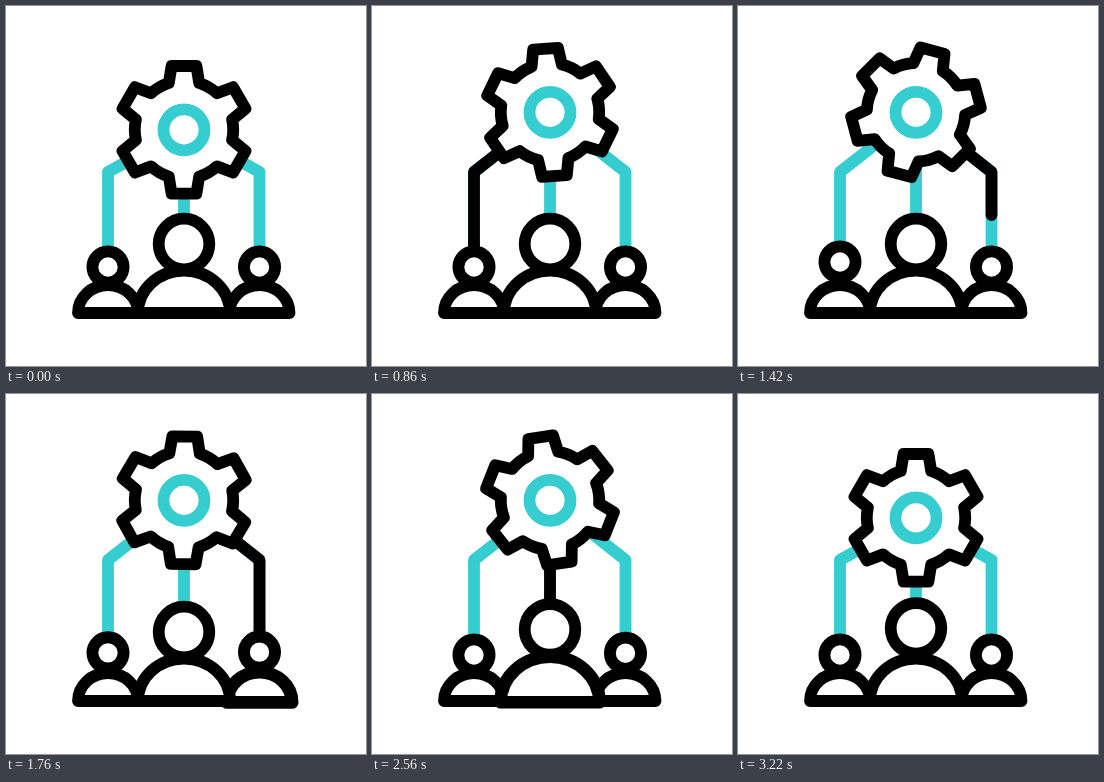
These frames come from a looping animation (360 px wide and 360 px high, 3.24 s). An HTML page with a canvas:

```html
<!DOCTYPE html>
<html>
<head>
<meta charset="utf-8">
<style>
html, body { margin: 0; width: 100%; height: 100%; overflow: hidden; background: #fff; }
canvas { display: block; }
</style>
</head>
<body>
<canvas id="stage" width="360" height="360"></canvas>
<script>
const c = document.getElementById('stage').getContext('2d');
const LOOP = 3240, STEP = 20, BLACK = '#000', TEAL = '#35cdcf';

const ramp = (t, a, b) => Math.min(1, Math.max(0, (t - a) / (b - a)));
const smooth = (t, a, b) => { const u = ramp(t, a, b); return u * u * (3 - 2 * u); };
const bump = (t, a, b) => Math.sin(Math.PI * ramp(t, a, b));

// Smooth curve through [time, value] keys, flat outside them.
function curve(keys, t) {
  const last = keys.length - 1;
  if (t <= keys[0][0]) return keys[0][1];
  if (t >= keys[last][0]) return keys[last][1];
  const i = keys.findIndex(k => k[0] > t) - 1;
  const slope = j => {
    const a = keys[Math.max(0, j - 1)], b = keys[Math.min(last, j + 1)];
    return (b[1] - a[1]) / (b[0] - a[0]);
  };
  const [t0, v0] = keys[i], [t1, v1] = keys[i + 1];
  const d = t1 - t0, u = (t - t0) / d, e = u * u * (3 - 2 * u);
  return v0 + (v1 - v0) * e
    + d * (slope(i) * u * (1 - u) ** 2 - slope(i + 1) * u * u * (1 - u));
}

const SPIN = [[260, 0], [600, 28.5], [860, 56], [1420, 135], [1760, 180.7], [2560, 291.6], [3220, 360]];
const LIFT = [[560, 0], [680, 2.9], [1000, 5.3], [1120, 5], [1420, 2.7], [1570, 0]];

// Each person's signal starts at its own moment; the rest follows from it.
const people = [
  { x: 102, start: 300, side: -1 },
  { x: 253.5, start: 1080, side: 1 },
  { x: 178, start: 1900, side: 0 }
];

function shape(color = BLACK, filled = true) {
  if (filled) { c.fillStyle = '#fff'; c.fill(); }
  c.strokeStyle = color;
  c.stroke();
}

function circle(x, y, r, color) {
  c.beginPath();
  c.arc(x, y, r, 0, 2 * Math.PI);
  shape(color);
}

// Strokes the part of a polyline between two fractions of its length.
function wire(pts, from, to, color) {
  if (from >= to) return;
  let length = 0;
  c.beginPath();
  pts.forEach(([x, y], i) => {
    c.lineTo(x, y);
    if (i) length += Math.hypot(x - pts[i - 1][0], y - pts[i - 1][1]);
  });
  c.setLineDash([0, from * length, (to - from) * length, 2 * length]);
  c.lineCap = 'round';
  shape(color, false);
  c.setLineDash([]);
}

function gear(y, degrees) {
  const rad = Math.PI / 180;
  c.save();
  c.translate(178, y);
  c.rotate(degrees * rad);
  c.beginPath();
  for (let a = -90; a < 270; a += 60) {
    for (const off of [-11, 11])
      c.lineTo(65 * Math.cos((a + off) * rad), 65 * Math.sin((a + off) * rad));
    c.arc(0, 0, 49.2, (a + 18) * rad, (a + 42) * rad);
  }
  c.closePath();
  shape();
  c.restore();
  circle(178, y, 20.5, TEAL);
}

function body(x, w, h, scale) {
  c.save();
  c.translate(x, 290);
  c.scale(scale, scale);
  c.beginPath();
  c.ellipse(0, 17, w, h, 0, Math.PI, 2 * Math.PI);
  c.closePath();
  shape();
  c.restore();
}

function draw(t) {
  c.fillStyle = '#fff';
  c.fillRect(0, 0, 360, 360);
  c.lineWidth = 11.8;
  c.lineJoin = 'round';

  const hub = 123.8 - 17.5 * (smooth(t, 260, 660) - smooth(t, 2740, 3140));
  const spread = 7 * bump(t, 2740, 3200);

  for (const p of people) {
    const x = p.x + p.side * spread, s = t - p.start;
    const pts = p.side ? [[178, hub], [x, 166], [x, 250]] : [[178, hub], [178, 222]];
    wire(pts, 0, 1, TEAL);
    wire(pts, ramp(s, 740, 1100), ramp(s, 0, 440), BLACK);
  }
  gear(hub, curve(SPIN, t));

  for (const p of people) {
    const x = p.x + p.side * spread, s = t - p.start;
    const scale = 1 + 0.13 * bump(s, 560, 1080), lift = curve(LIFT, s);
    if (p.side) {
      body(x, 30, 28, scale);
      circle(x, 261 - lift, 15.6);
    } else {
      body(x, 46, 42.5, scale);
      circle(x, 238 - lift, 25.3);
    }
  }
}

function tick() {
  const t = performance.now() % LOOP;
  draw(Math.floor(t / STEP) * STEP);
  requestAnimationFrame(tick);
}
tick();
</script>
</body>
</html>
```
